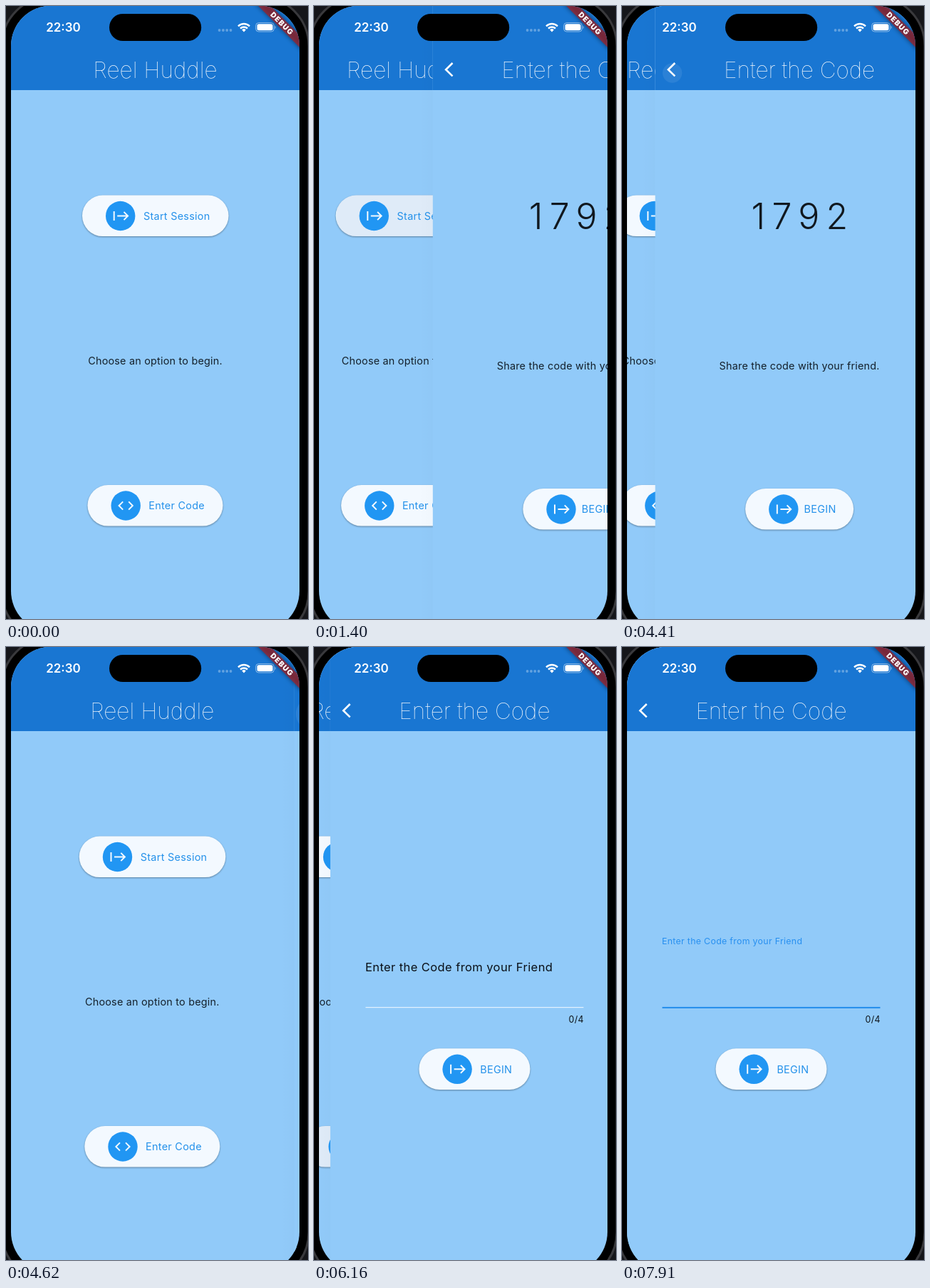
An HTML page that plays this animation: 424 by 860 pixels, repeating every 8000 ms.

```html
<!DOCTYPE html>
<html lang="en">
<head>
<meta charset="utf-8">
<title>Session app</title>
<style>
  html, body { margin: 0; width: 100%; height: 100%; overflow: hidden; background: #111214; }
  svg { display: block; width: 424px; height: 860px; }
  text { font-family: Inter, "Noto Sans", sans-serif; white-space: pre; }
  .title { font-size: 31.6px; font-weight: 100; fill: #fff; text-anchor: middle; }
  .label { font-size: 14.4px; letter-spacing: .28px; fill: #2491ea; }
  .body { font-size: 14.4px; letter-spacing: .21px; fill: #14202b; text-anchor: middle; }
  .pill { fill: #f3f9ff; filter: drop-shadow(0 1.2px .9px rgba(0, 0, 0, .36)); }
  .icon { fill: none; stroke: #f4faff; stroke-width: 2; }
</style>
</head>
<body>
<svg id="stage" viewBox="0 0 424 860" xmlns="http://www.w3.org/2000/svg"></svg>
<script>
const LOOP = 8000, SLIDE = 350, WIDTH = 405;
const SHARE_AT = 1323, BACK_AT = 4391.5, ENTER_AT = 5968, FOCUS_AT = 7235;

const ICONS = {
  start: 'M-9-6.5V6.5M-4.5 0H10M4.8-5.6 10.4 0 4.8 5.6',
  code: 'M-4-5.6-9.6 0-4 5.6M4-5.6 9.6 0 4 5.6'
};

// Pill button with a round icon and room for a touch ripple
function button(id, x, y, w, icon, textX, label) {
  const shape = `x="${x}" y="${y}" width="${w}" height="57.6" rx="28.8"`;
  const cx = x + 53.7, cy = y + 29;
  return `<clipPath id="${id}Clip"><rect ${shape}/></clipPath>
    <rect class="pill" id="${id}" ${shape}/>
    <g clip-path="url(#${id}Clip)"><circle id="${id}Ripple" fill="#6164b9" r="0"/></g>
    <circle cx="${cx}" cy="${cy}" r="20.7" fill="#2196f3"/>
    <path class="icon" d="${ICONS[icon]}" transform="translate(${cx} ${cy})"/>
    <text class="label" x="${textX}" y="${cy + 5.2}">${label}</text>`;
}

function page(id, title, content, pushed = true) {
  const edge = pushed
    ? `<rect x="-13" width="20" height="860" fill="url(#edge)"/>` : '';
  const back = pushed
    ? `<circle id="${id}Touch" cx="31" cy="94" r="0" fill="#fff" opacity=".08"/>
       <path d="M34.7 80 25.3 89.2 34.7 98.4" fill="none" stroke="#fff" stroke-width="2.6"/>` : '';
  return `<g id="${id}">${edge}
    <rect x="7" y="-5" width="${WIDTH}" height="870" fill="#91caf9"/>
    <rect x="7" y="-5" width="${WIDTH}" height="123" fill="#1976d2"/>
    ${back}<text class="title" x="209.5" y="100.5">${title}</text>${content}</g>`;
}

const home = page('home', 'Reel Huddle',
  button('begin', 107, 265.5, 205.5, 'start', 193, 'Start Session') +
  `<text class="body" x="209.5" y="503">Choose an option to begin.</text>` +
  button('join', 114.5, 672, 190, 'code', 200.3, 'Enter Code'), false);

const share = page('share', 'Enter the Code',
  `<text x="142" y="313.3" font-size="50" font-weight="350" letter-spacing="9.2" fill="#11181f">1792</text>
   <text class="body" x="209.5" y="509.5">Share the code with your friend.</text>` +
  button('go', 133.5, 677, 152, 'start', 216, 'BEGIN'));

const enter = page('enter', 'Enter the Code',
  `<text id="hint" font-size="16.5" letter-spacing=".41">Enter the Code from your Friend</text>
   <rect id="line" x="56.5" width="306"/>
   <rect id="caret" x="208" y="419" width="2.1" height="75" rx="1" fill="#2196f3"/>
   <text x="363" y="526.6" font-size="12.4" letter-spacing=".4" text-anchor="end" fill="#0c1218">0/4</text>` +
  button('send', 131.5, 563.3, 156, 'start', 217.4, 'BEGIN'));

const dots = [299.6, 304.9, 310.2, 315.5]
  .map(x => `<circle cx="${x}" cy="34" r="1.9"/>`).join('');

const status = `
  <text x="80.5" y="36" font-size="17" font-weight="600" fill="#fff" text-anchor="middle">22:30</text>
  <rect x="145" y="10.9" width="129.2" height="38.2" rx="19.1"/>
  <g fill="#fff" opacity=".32">${dots}</g>
  <g fill="none" stroke="#fff" stroke-width="2.5">
    <path d="M326 28.3a11.6 11.6 0 0 1 16 0M329 31.5a7.2 7.2 0 0 1 10 0"/>
  </g>
  <path d="M334 36.4 331.2 33.4a4.1 4.1 0 0 1 5.6 0z" fill="#fff"/>
  <rect x="350.7" y="23.6" width="25.6" height="12.4" rx="4" fill="none" stroke="#fff" stroke-opacity=".5"/>
  <rect x="352.5" y="25.3" width="22" height="9" rx="2.5" fill="#fff"/>
  <path d="M377.6 27.8a2.4 2.4 0 0 1 0 4.2z" fill="#fff" opacity=".5"/>
  <g transform="translate(412 -.5) rotate(45)">
    <rect x="-48" y="28.8" width="96" height="12.4" opacity=".5" filter="url(#soft)"/>
    <rect x="-48" y="28.8" width="96" height="12.4" fill="#b71c1c" fill-opacity=".63"/>
    <text x=".5" y="38.8" font-size="10.3" font-weight="900" letter-spacing="1" fill="#fff" text-anchor="middle">DEBUG</text>
  </g>`;

document.getElementById('stage').innerHTML = `
  <defs>
    <clipPath id="screen"><rect x="7" y="-.5" width="${WIDTH}" height="878" rx="56.7"/></clipPath>
    <linearGradient id="edge"><stop offset="0" stop-opacity="0"/><stop offset="1" stop-opacity=".012"/></linearGradient>
    <filter id="soft" x="-20%" y="-100%" width="140%" height="300%"><feGaussianBlur stdDeviation="3"/></filter>
  </defs>
  <rect width="424" height="860" fill="#15161a"/>
  <rect x="-6" y="-13.5" width="431" height="904" rx="69.7" stroke="#39393c" stroke-width="3"/>
  <g clip-path="url(#screen)">${home}${share}${enter}${status}</g>`;

const el = id => document.getElementById(id);
const set = (id, attrs) => { for (const k in attrs) el(id).setAttribute(k, attrs[k]); };
const clamp = v => Math.min(1, Math.max(0, v));
const mix = (a, b, k) => a + (b - a) * k;
const blend = (a, b, k) => `rgb(${a.map((v, i) => Math.round(mix(v, b[i], k)))})`;

function bezier(x1, y1, x2, y2) {
  const at = (a, b, s) => 3 * a * s * (1 - s) ** 2 + 3 * b * s * s * (1 - s) + s ** 3;
  return x => {
    if (x <= 0 || x >= 1) return clamp(x);
    let lo = 0, hi = 1;
    for (let i = 0; i < 24; i++) {
      const mid = (lo + hi) / 2;
      if (at(x1, x2, mid) < x) lo = mid; else hi = mid;
    }
    return at(y1, y2, lo);
  };
}

const ease = bezier(.25, .1, .25, 1);
const settle = bezier(.4, 0, .2, 1);
const parallax = bezier(.35, .91, .33, .97);

// Two cubic pieces joined at (MX, MY): quick start, long tail
const MX = .198, MY = .541;
const head = bezier(.056 / MX, .024 / MY, .108 / MX, .3085 / MY);
const tail = bezier((.3655 - MX) / (1 - MX), 1, (.5465 - MX) / (1 - MX), (.989 - MY) / (1 - MY));
const slide = u => u < MX ? MY * head(u / MX) : MY + (1 - MY) * tail((u - MX) / (1 - MX));

function ripple(id, t, down, up, from, center, reach) {
  const held = (Math.min(t, up) - down) / 1000;
  const k = ease(clamp(held + Math.max(0, t - up) / 225));
  const fade = clamp((t - down) / 50) * (1 - clamp((t - up - 225) / 150));
  set(id + 'Ripple', {
    cx: mix(from[0], center[0], k), cy: mix(from[1], center[1], k),
    r: mix(reach * .31, reach + 5, k), opacity: .1 * fade
  });
  set(id, { style: `fill:${blend([243, 249, 255], [237, 250, 255], fade)}` });
}

function movePages(t) {
  const at = start => clamp((t - start) / SLIDE);
  let back = 0, shareX = 1, enterX = 1;
  if (t < BACK_AT) {
    shareX = 1 - slide(at(SHARE_AT));
    back = parallax(at(SHARE_AT));
  } else if (t < ENTER_AT) {
    shareX = slide(at(BACK_AT));
    back = 1 - parallax(at(BACK_AT));
  } else {
    enterX = 1 - slide(at(ENTER_AT));
    back = parallax(at(ENTER_AT));
  }
  const shift = (id, x) => set(id, { transform: `translate(${x} 0)` });
  shift('home', -WIDTH / 3 * back);
  shift('share', WIDTH * shareX);
  shift('enter', WIDTH * enterX);
  el('share').style.display = shareX < 1 ? '' : 'none';
  el('enter').style.display = enterX < 1 ? '' : 'none';
}

function focusField(t) {
  const k = settle(clamp((t - FOCUS_AT) / 167));
  set('hint', {
    transform: `translate(56 ${mix(454.5, 416.7, k)}) scale(${mix(1, .75, k)})`,
    fill: blend([10, 16, 24], [40, 144, 240], k)
  });
  set('line', {
    y: mix(505.1, 504.9, k), height: mix(1.1, 2.1, k),
    fill: blend([236, 246, 255], [40, 144, 236], k)
  });
  const on = t > FOCUS_AT + 20 ? 1 - clamp((t - 7790) / 100) : 0;
  set('caret', { opacity: on });
}

function draw(t) {
  movePages(t);
  ripple('begin', t, 1020, SHARE_AT, [243, 298], [209.7, 294.3], 106);
  ripple('join', t, 5835, ENTER_AT, [243, 707], [209.5, 700.8], 99);
  const touch = t - BACK_AT;
  set('shareTouch', { r: touch > 0 ? mix(13, 22, ease(clamp(touch / 225))) : 0 });
  focusField(t);
}

function tick() {
  draw(performance.now() % LOOP);
  requestAnimationFrame(tick);
}
tick();
</script>
</body>
</html>
```
